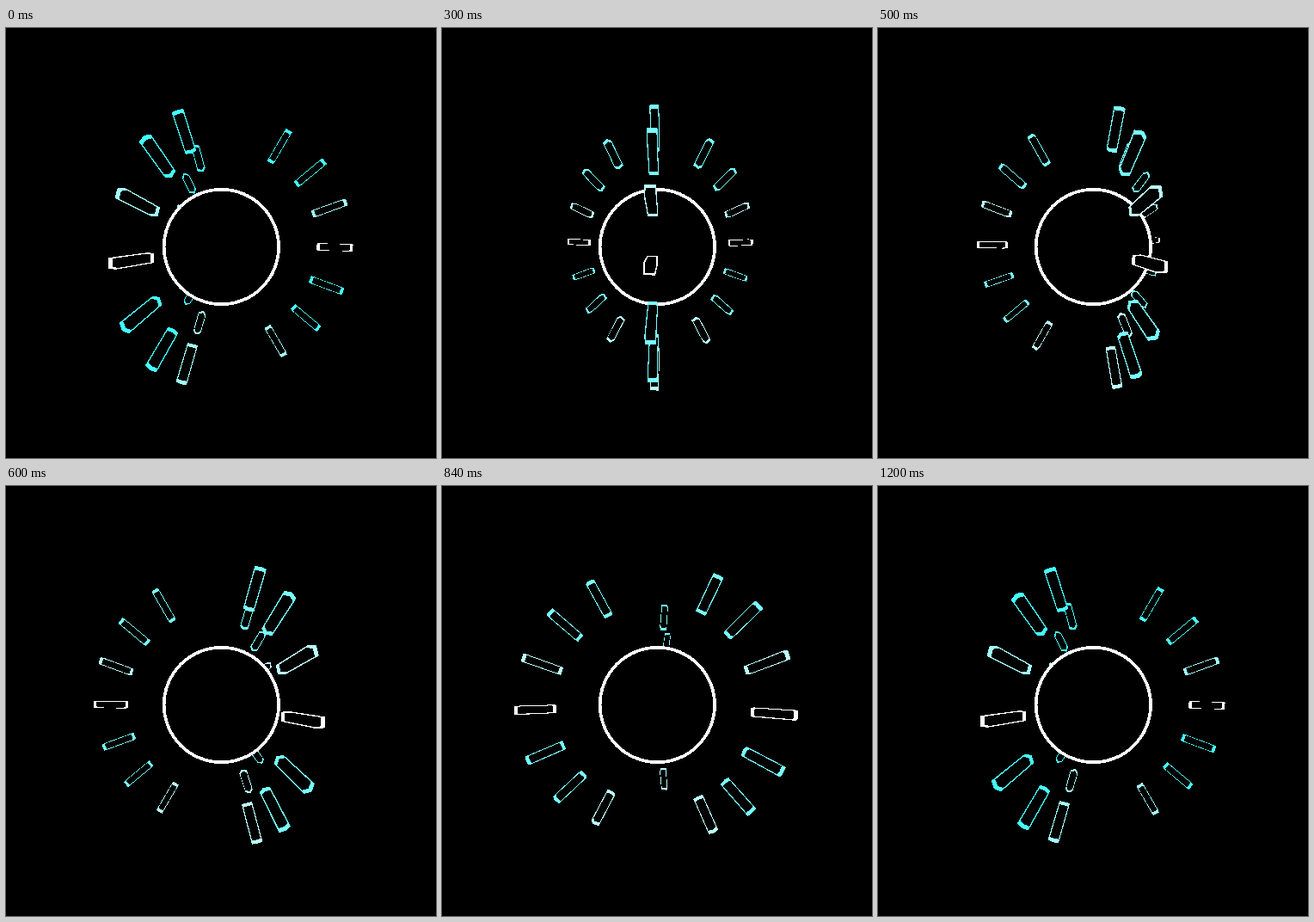
Animation, 500 px wide and 500 px high, one loop 1.22 s. Source, as an HTML page with a canvas:

```html
<!DOCTYPE html>
<html lang="en">
<head>
<meta charset="utf-8">
<title>Rotating sun</title>
<style>
html, body { margin: 0; height: 100%; overflow: hidden; background: #000; }
canvas { display: block; }
</style>
</head>
<body>
<canvas id="stage" width="500" height="500"></canvas>
<script>
const ctx = document.getElementById('stage').getContext('2d', { willReadFrequently: true });
const { sin, cos, PI } = Math;
const SIZE = 500, LOOP = 1220, STEP = 20;
const CX = 250.4, CY = 254.5, CAMERA = 330;
const PITCH = 5.5 * PI / 180;
const RAY = { mid: 130, length: 15.8, width: 3.25, outline: 1.2 };
const TINT = [[0, 68], [300, 119], [840, 119], [1040, 255], [1200, 68], [1220, 68]];
// How far each latitude's colour is blended to white
const WHITENESS = { '-60': 0.5, 0: 1, 20: 0.5 };

// Red channel of the ray colour: cyan fading to white and back
function tintAt(t) {
  const i = TINT.findIndex(key => key[0] > t);
  const [t0, a] = TINT[i - 1], [t1, b] = TINT[i];
  return a + (b - a) * (t - t0) / (t1 - t0);
}

// Local ray coordinates (out, east, north) to camera space
function place(lat, lon, out, east, north) {
  const ring = out * cos(lat) - north * sin(lat);
  const up = out * sin(lat) + north * cos(lat);
  const x = ring * sin(lon) + east * cos(lon);
  const z = ring * cos(lon) - east * sin(lon);
  return [x, z * sin(PITCH) - up * cos(PITCH), z * cos(PITCH) + up * sin(PITCH)];
}

function project([x, y, z]) {
  const scale = CAMERA / (CAMERA - z);
  return [CX + x * scale, CY + y * scale];
}

function hull(points) {
  points.sort((a, b) => a[0] - b[0] || a[1] - b[1]);
  const chain = list => {
    const h = [];
    for (const p of list) {
      while (h.length > 1) {
        const [a, b] = h.slice(-2);
        if ((b[0] - a[0]) * (p[1] - a[1]) - (b[1] - a[1]) * (p[0] - a[0]) > 0) break;
        h.pop();
      }
      h.push(p);
    }
    return h.slice(0, -1);
  };
  return [...chain(points), ...chain([...points].reverse())];
}

function fillBox({ lat, lon }, grow, color) {
  const corners = [], w = RAY.width * grow;
  for (const i of [-1, 1]) for (const j of [-1, 1]) for (const k of [-1, 1]) {
    corners.push(project(place(lat, lon, RAY.mid + i * RAY.length * grow, j * w, k * w)));
  }
  ctx.beginPath();
  hull(corners).forEach(p => ctx.lineTo(...p));
  ctx.fillStyle = color;
  ctx.fill();
}

function disc(radius, color) {
  ctx.beginPath();
  ctx.arc(CX, CY, radius, 0, 2 * PI);
  ctx.fillStyle = color;
  ctx.fill();
}

// Crisp pixels: every edge is either full colour or black
function harden() {
  const image = ctx.getImageData(0, 0, SIZE, SIZE), d = image.data;
  for (let i = 0; i < d.length; i += 4) {
    const g = d[i + 1];
    if (!g) continue;
    const on = g > 108;
    d[i] = on ? d[i] * 255 / g : 0;
    d[i + 1] = d[i + 2] = on ? 255 : 0;
  }
  ctx.putImageData(image, 0, 0);
}

function draw(t) {
  const turn = -32 + t / 10;
  const tint = tintAt(t);
  const rays = [];
  for (let lon = 0; lon < 360; lon += 120) {
    for (let lat = -60; lat <= 60; lat += 20) {
      const red = tint + (255 - tint) * (WHITENESS[lat] || 0);
      const ray = { lat: lat * PI / 180, lon: (turn + lon) * PI / 180, color: `rgb(${red}, 255, 255)` };
      ray.depth = place(ray.lat, ray.lon, RAY.mid, 0, 0)[2];
      rays.push(ray);
    }
  }
  rays.sort((a, b) => a.depth - b.depth);

  const drawRay = ray => {
    fillBox(ray, RAY.outline, ray.color);
    fillBox(ray, 1, '#000');
  };
  ctx.fillStyle = '#000';
  ctx.fillRect(0, 0, SIZE, SIZE);
  rays.filter(r => r.depth < 0).forEach(drawRay);
  disc(68.5, '#fff');
  disc(65, '#000');
  rays.filter(r => r.depth >= 0).forEach(drawRay);
  harden();
}

function frame() {
  const t = performance.now() % LOOP;
  draw(Math.floor(t / STEP) * STEP);
  requestAnimationFrame(frame);
}
frame();
</script>
</body>
</html>
```
